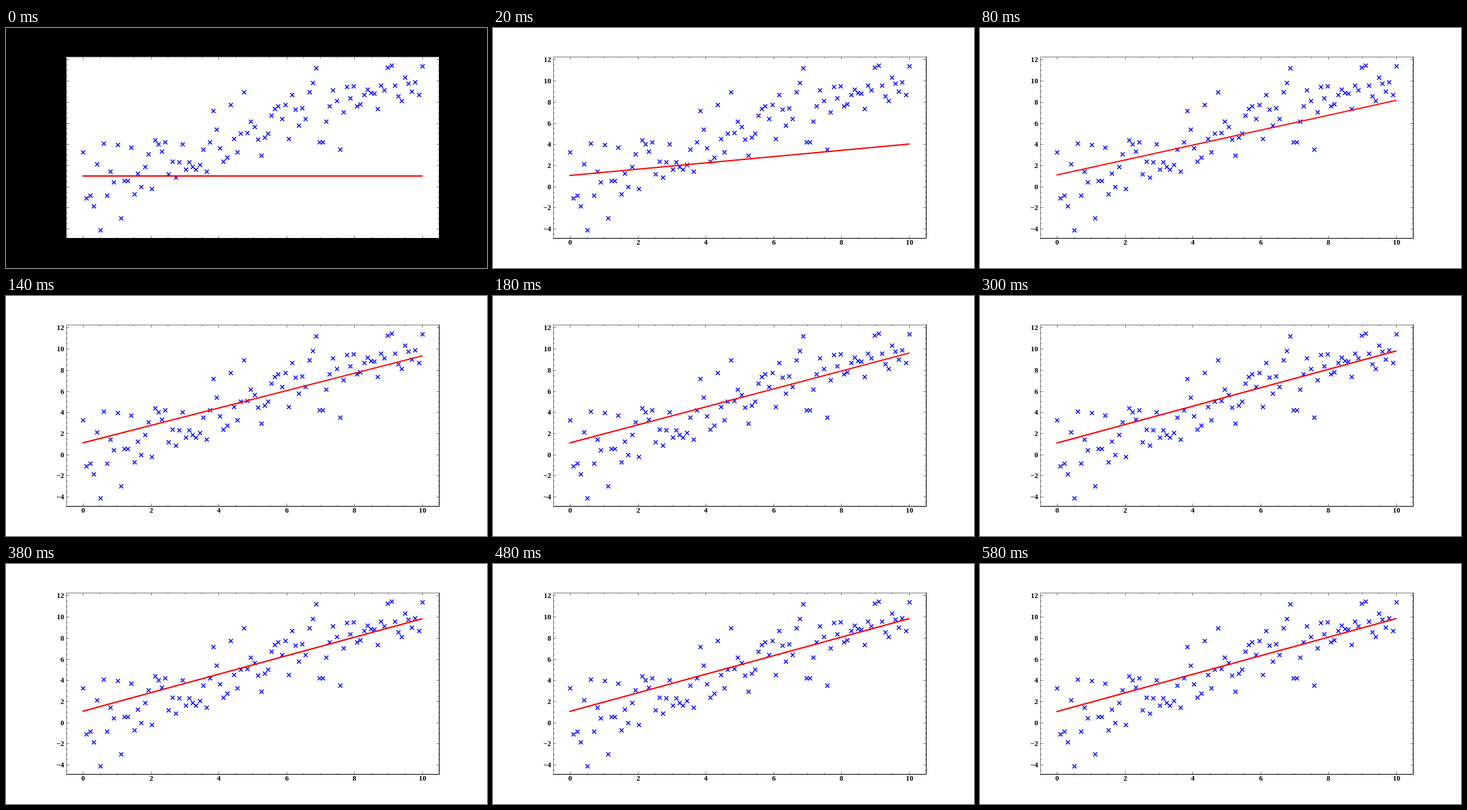
Animation of 720x360 px, one loop 0.6 s. Source, as an HTML page with a canvas:

```html
<!DOCTYPE html>
<html lang="en">
<head>
<meta charset="utf-8">
<title>Linear regression by gradient descent</title>
<style>
html, body { margin: 0; width: 720px; height: 360px; overflow: hidden; }
canvas { display: block; }
</style>
</head>
<body>
<canvas id="plot" width="720" height="360"></canvas>
<script>
const ctx = document.getElementById('plot').getContext('2d');
const STEPS = 30, STEP_MS = 20, RATE = 0.01, COUNT = 100;
const LEFT = 90, RIGHT = 648, TOP = 43.2, BOTTOM = 315;

// Mersenne Twister (MT19937), returning doubles in [0, 1)
function mersenneTwister(seed) {
  const N = 624, M = 397, state = new Uint32Array(N);
  let index = 0;
  state[0] = seed;
  for (let i = 1; i < N; i++) {
    const prev = state[i - 1] ^ (state[i - 1] >>> 30);
    state[i] = Math.imul(1812433253, prev) + i;
  }
  function next() {
    const following = (index + 1) % N;
    const mixed = (state[index] & 0x80000000) | (state[following] & 0x7fffffff);
    state[index] = state[(index + M) % N] ^ (mixed >>> 1) ^ (mixed & 1 ? 0x9908b0df : 0);
    let y = state[index];
    index = following;
    y ^= y >>> 11;
    y ^= (y << 7) & 0x9d2c5680;
    y ^= (y << 15) & 0xefc60000;
    return (y ^ (y >>> 18)) >>> 0;
  }
  return () => {
    const high = next() >>> 5, low = next() >>> 6;
    return (high * 2 ** 26 + low) / 2 ** 53;
  };
}

// Normal deviates in pairs by the polar method
function gaussianPair(random) {
  let a, b, r;
  do {
    a = 2 * random() - 1;
    b = 2 * random() - 1;
    r = a * a + b * b;
  } while (r >= 1 || r === 0);
  const f = Math.sqrt(-2 * Math.log(r) / r);
  return [f * b, f * a];
}

const random = mersenneTwister(1);
const noise = Array.from({ length: COUNT / 2 }, () => gaussianPair(random)).flat();
const samples = noise.map((n, i) => {
  const x = 10 * i / (COUNT - 1);
  return { x, y: x + 2 * n };
});

// Linear scale with a 5% margin at both ends
function scale(values, start, end) {
  const min = Math.min(...values), max = Math.max(...values);
  return v => start + (end - start) * (0.05 + (v - min) / (max - min)) / 1.1;
}
const toX = scale(samples.map(s => s.x), LEFT, RIGHT);
const toY = scale(samples.map(s => s.y), BOTTOM, TOP);
const snap = v => Math.round(v) + 0.5;

function descend(steps) {
  const fits = [{ bias: 1, slope: 0 }];
  while (fits.length < steps) {
    const { bias, slope } = fits[fits.length - 1];
    let gradBias = 0, gradSlope = 0;
    for (const { x, y } of samples) {
      const error = bias + slope * x - y;
      gradBias += error / COUNT;
      gradSlope += error * x / COUNT;
    }
    fits.push({ bias: bias - RATE * gradBias, slope: slope - RATE * gradSlope });
  }
  return fits;
}
const fits = descend(STEPS);

function strokeLine(x1, y1, x2, y2) {
  ctx.beginPath();
  ctx.moveTo(x1, y1);
  ctx.lineTo(x2, y2);
  ctx.stroke();
}

function drawSamples() {
  ctx.strokeStyle = '#00f';
  ctx.lineWidth = 1.4;
  for (const sample of samples) {
    const x = snap(toX(sample.x)), y = snap(toY(sample.y));
    strokeLine(x - 3, y - 3, x + 3, y + 3);
    strokeLine(x - 3, y + 3, x + 3, y - 3);
  }
}

function drawFit({ bias, slope }) {
  const align = slope ? y => y : Math.round;
  ctx.strokeStyle = '#f00';
  ctx.lineWidth = 2;
  ctx.lineCap = 'square';
  strokeLine(toX(0), align(toY(bias)), toX(10), align(toY(bias + 10 * slope)));
  ctx.lineCap = 'butt';
}

function drawAxes() {
  const left = snap(LEFT), right = snap(RIGHT), top = snap(TOP), bottom = snap(BOTTOM);
  ctx.strokeStyle = ctx.fillStyle = '#000';
  ctx.font = 'bold 11px "Liberation Serif", serif';
  ctx.lineWidth = 0.5;

  ctx.textAlign = 'center';
  for (let v = 0; v <= 10; v += 0.5) {
    const x = snap(toX(v)), major = v % 2 === 0, size = major ? 4 : 2;
    strokeLine(x, bottom, x, bottom - size);
    strokeLine(x, top, x, top + size);
    if (major) ctx.fillText(v, x, 325);
  }
  ctx.textAlign = 'right';
  for (let v = -4.5; v <= 12; v += 0.5) {
    const y = snap(toY(v)), major = v % 2 === 0, size = major ? 4 : 2;
    strokeLine(left, y, left + size, y);
    strokeLine(right, y, right - size, y);
    if (major) ctx.fillText(String(v).replace('-', '\u2212'), 87, y + 3.5);
  }

  strokeLine(left, bottom, left, top);
  strokeLine(left, top, right, top);
  ctx.lineWidth = 1;
  strokeLine(right, top - 0.5, right, bottom + 0.5);
  strokeLine(left - 0.5, bottom, right, bottom);
}

function draw(step) {
  ctx.fillStyle = step ? '#fff' : '#000';
  ctx.fillRect(0, 0, 720, 360);
  ctx.fillStyle = '#fff';
  ctx.fillRect(LEFT, Math.round(TOP), RIGHT - LEFT, BOTTOM - Math.round(TOP));
  drawSamples();
  drawFit(fits[step]);
  drawAxes();
}

function tick() {
  draw(Math.floor(performance.now() / STEP_MS) % STEPS);
  requestAnimationFrame(tick);
}
tick();
</script>
</body>
</html>
```
